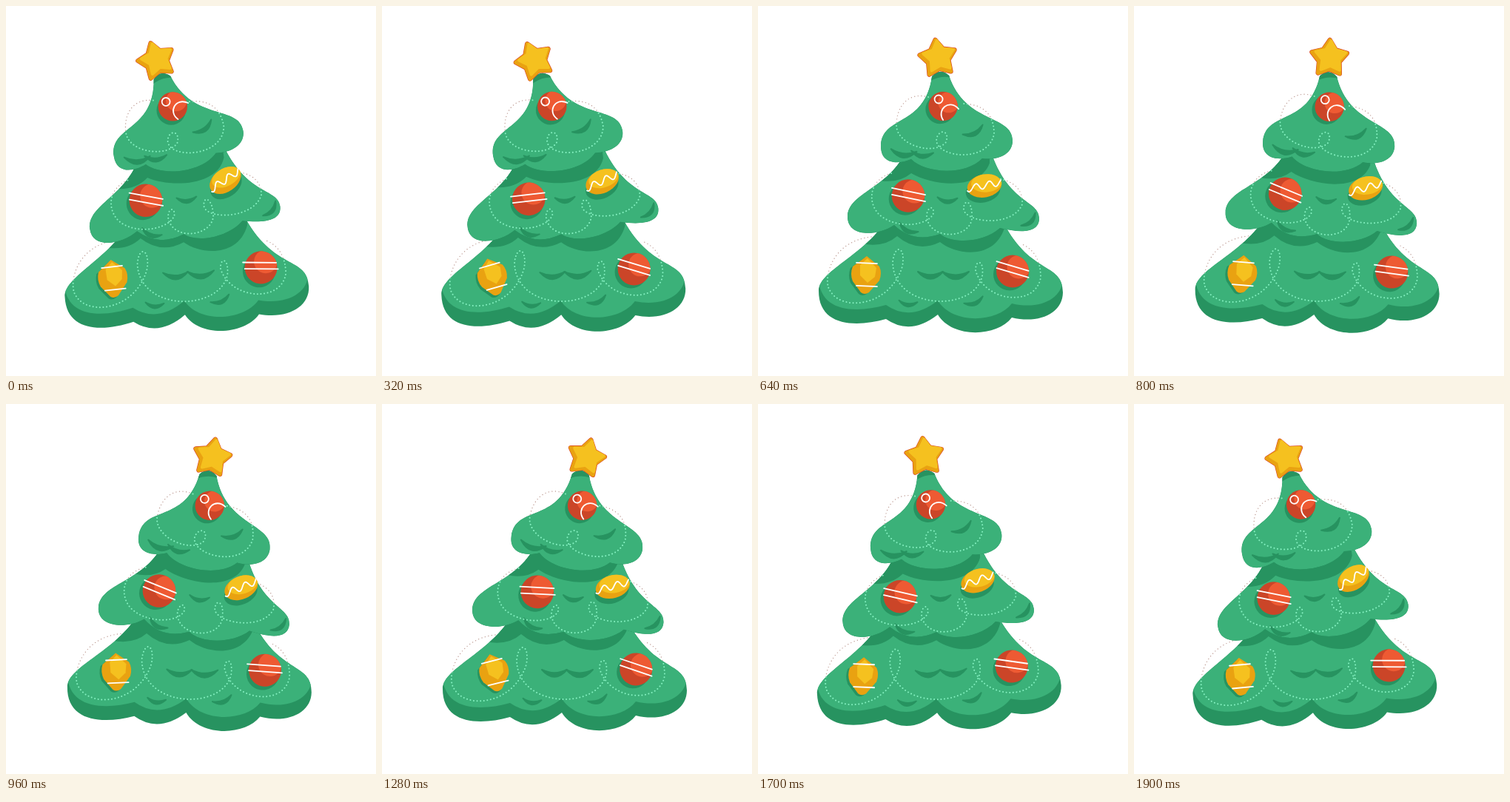
These frames come from a looping animation (500x500 px, 1.92 s). An HTML page with a canvas:

```html
<!DOCTYPE html>
<html>
<head>
<meta charset="utf-8">
<style>
html, body { margin: 0; overflow: hidden; background: #fff; }
canvas { display: block; }
</style>
</head>
<body>
<canvas id="stage" width="500" height="500"></canvas>
<script>
const ctx = document.getElementById('stage').getContext('2d');
const LOOP = 1920, TAU = Math.PI * 2, REST = TAU / 3;
const GREEN = '#3bb179', SHADE = '#279360', MINT = '#86f2c2', FAINT = '#bd9a92';
const RED = '#ee5a33', DARK_RED = '#cb4528', YELLOW = '#f5c11f', AMBER = '#e9a211';

const path = d => new Path2D(d);

function ellipse(x, y, rx, ry = rx, tilt = 0) {
  const p = path();
  p.ellipse(x, y, rx, ry, tilt, 0, TAU);
  return p;
}

function fill(p, color) {
  ctx.fillStyle = color;
  ctx.fill(p);
}

function stroke(p, color, width, dash = []) {
  ctx.strokeStyle = color;
  ctx.lineWidth = width;
  ctx.setLineDash(dash);
  ctx.stroke(p);
}

function turn(x, y, angle) {
  ctx.translate(x, y);
  ctx.rotate(angle);
  ctx.translate(-x, -y);
}

function scoped(draw) {
  ctx.save();
  draw();
  ctx.restore();
}

// Both motions are measured from the pose the shapes are drawn in.
const sway = (phase, amp, lag) => amp * (Math.cos(REST - lag) - Math.cos(phase - lag));
const swing = (phase, amp, lag) =>
  amp * (Math.cos(2 * phase - lag) - Math.cos(2 * REST - lag));

// Two parallel lines around a centre.
function stripes(x, y, length, gap, tilt) {
  const p = path(), dx = length / 2 * Math.cos(tilt), dy = length / 2 * Math.sin(tilt);
  for (const side of [-gap / 2, gap / 2]) {
    p.moveTo(x - dx, y + side - dy);
    p.lineTo(x + dx, y + side + dy);
  }
  return p;
}

function wave(x, y, length, slope) {
  const p = path();
  for (let i = 0; i <= length; i++)
    p.lineTo(x + i, y + i * slope + 4.5 * Math.sin((i + 2) * TAU / 18));
  return p;
}

function star(x, y, outer, inner) {
  const p = path();
  for (let i = 0; i < 10; i++) {
    const r = i % 2 ? inner : outer, a = i * TAU / 10 - 0.146;
    p.lineTo(x + r * Math.sin(a), y - r * Math.cos(a));
  }
  p.closePath();
  return p;
}

const ball = (x, y, r, mark, amp, lag) => ({
  mark, amp, lag, pivot: [x + 1, y - 20], offset: [-4, 4],
  shape: ellipse(x, y, r), glow: ellipse(x + r * 0.38, y - r * 0.27, r * 0.72),
  base: DARK_RED, light: RED
});

const rings = path('M250 154C241 140 258 125 271 139');
rings.addPath(ellipse(244, 126, 5.5));

const gem = {
  mark: stripes(147, 363, 28, 31, 0.04), amp: 0.17, lag: -1.4,
  pivot: [147, 343], offset: [-3, 2], base: AMBER, light: YELLOW,
  shape: path('M147 338L164 352Q168 361 164 371L150 387Q144 391 139 387L128 372Q124 362 128 352Z'),
  glow: path('M148 341L160 354 158 366 148 374 138 364 138 350Z')
};

const oval = {
  mark: wave(283, 247, 45, -0.2), amp: 0.16, lag: 3.66,
  pivot: [308, 225], offset: [-2, 7], base: AMBER, light: YELLOW,
  shape: ellipse(306, 243, 23.5, 15.5, -0.2), glow: ellipse(309, 239, 21, 12.5, -0.1)
};

// Folds are [x, y, width, tilt].
const tiers = [
  {
    pivot: [248, 440], amp: 0.0325, lag: 0, rim: 19,
    body: path('M180 278C152 335 82 356 82 385C82 432 130 435 173 423Q206 446 243 417C262 449 322 448 343 421C380 430 412 415 412 387C412 345 365 365 328 285Z'),
    shadow: path('M140 270V321Q170 327 188 311Q215 334 246 319C270 338 320 342 333 300V270Z'),
    folds: [[233, 359, 34, 0], [267, 359, 36, 0], [203, 399, 25, 0.1], [291, 397, 27, -0.35]],
    garland: path('M153 312C100 318 90 365 95 380C108 415 178 408 195 352C200 325 185 320 182 346C183 412 292 414 303 365C306 342 294 342 294 357C305 400 375 408 382 367Q382 333 357 322'),
    toys: [gem, ball(344, 358.5, 22, stripes(344, 356, 45, 9, 0.29), 0.17, 3.02)]
  },
  {
    pivot: [248, 300], amp: 0.0805, lag: 0.45, rim: 0,
    body: path('M200 195C178 247 121 252 121 285C121 312 160 312 184 296Q210 321 246 308C262 322 305 320 327 300C355 307 380 307 380 287C380 262 338 268 314 195Z'),
    shadow: path('M165 190V236Q190 240 207 226C235 243 300 250 313 212V190Z'),
    folds: [[204, 299, 28, 0.45], [256, 259, 27, 0.05], [365, 288, 26, -0.73]],
    garland: path('M180 226C148 236 148 268 165 283C190 303 232 296 237 280C238 268 228 272 228 284C230 318 292 316 289 282C289 262 277 260 278 276C285 294 345 298 357 268Q359 240 325 233'),
    toys: [ball(203, 256.5, 22.3, stripes(203.5, 255, 46, 9, 0.2), 0.185, -0.71), oval]
  },
  {
    pivot: [248, 205], amp: 0.067, lag: 0.84, rim: 0,
    body: path('M235 95C225 165 166 147 166 190C166 213 188 215 207 207C225 226 280 230 303 206C325 209 344 200 344 182C344 146 280 160 258 94Q246 83 235 95Z'),
    shadow: path('M215 80V115Q246 84 275 103V80Z'),
    folds: [[197, 195, 35, 0.1], [222, 197, 30, 0.1], [290, 167, 30, -0.45]],
    garland: path('M230 123C200 115 186 140 187 163C190 190 240 202 254 184C260 166 242 166 241 182C243 206 313 212 319 172Q318 132 275 132'),
    toys: [ball(250, 135.5, 19.7, rings, 0.16, -2.1)]
  }
];

const starBase = star(243, 70.5, 25, 14.5), starFace = star(244.5, 68.3, 21.5, 12);

function drawFold([x, y, width, tilt]) {
  scoped(() => {
    ctx.translate(x, y);
    ctx.rotate(tilt);
    const w = width / 2;
    const p = path(`M${-w} 0Q0 ${w * 1.15} ${w} 0Q0 ${w * 0.5} ${-w} 0Z`);
    fill(p, SHADE);
    stroke(p, SHADE, 2);
  });
}

function drawToy(toy, phase) {
  scoped(() => {
    turn(...toy.pivot, swing(phase, toy.amp, toy.lag));
    scoped(() => {
      ctx.translate(...toy.offset);
      fill(toy.shape, SHADE);
    });
    scoped(() => {
      fill(toy.shape, toy.base);
      ctx.clip(toy.shape);
      fill(toy.glow, toy.light);
    });
    stroke(toy.mark, '#fff', 1.8);
  });
}

function drawTier(tier, phase) {
  turn(...tier.pivot, sway(phase, tier.amp, tier.lag));
  stroke(tier.garland, FAINT, 1.4, [0, 4.6]);
  fill(tier.body, SHADE);
  scoped(() => {
    ctx.clip(tier.body);
    // The lit area is the body lifted off its dark rim.
    scoped(() => {
      ctx.translate(0, -tier.rim);
      fill(tier.body, GREEN);
    });
    fill(tier.shadow, SHADE);
    tier.folds.forEach(drawFold);
    stroke(tier.garland, MINT, 2, [0, 4.6]);
  });
  for (const toy of tier.toys) drawToy(toy, phase);
}

function drawStar(phase) {
  turn(246, 100, sway(phase, 0.18, 0.98));
  stroke(starBase, '#d8432a', 6.2);
  stroke(starBase, AMBER, 5);
  fill(starBase, AMBER);
  stroke(starFace, YELLOW, 4);
  fill(starFace, YELLOW);
}

function frame() {
  const phase = performance.now() % LOOP / LOOP * TAU;
  ctx.fillStyle = '#fff';
  ctx.fillRect(0, 0, 500, 500);
  scoped(() => {
    ctx.lineCap = ctx.lineJoin = 'round';
    // Each tier rides on the one below it.
    for (const tier of tiers) drawTier(tier, phase);
    drawStar(phase);
  });
  requestAnimationFrame(frame);
}
frame();
</script>
</body>
</html>
```
